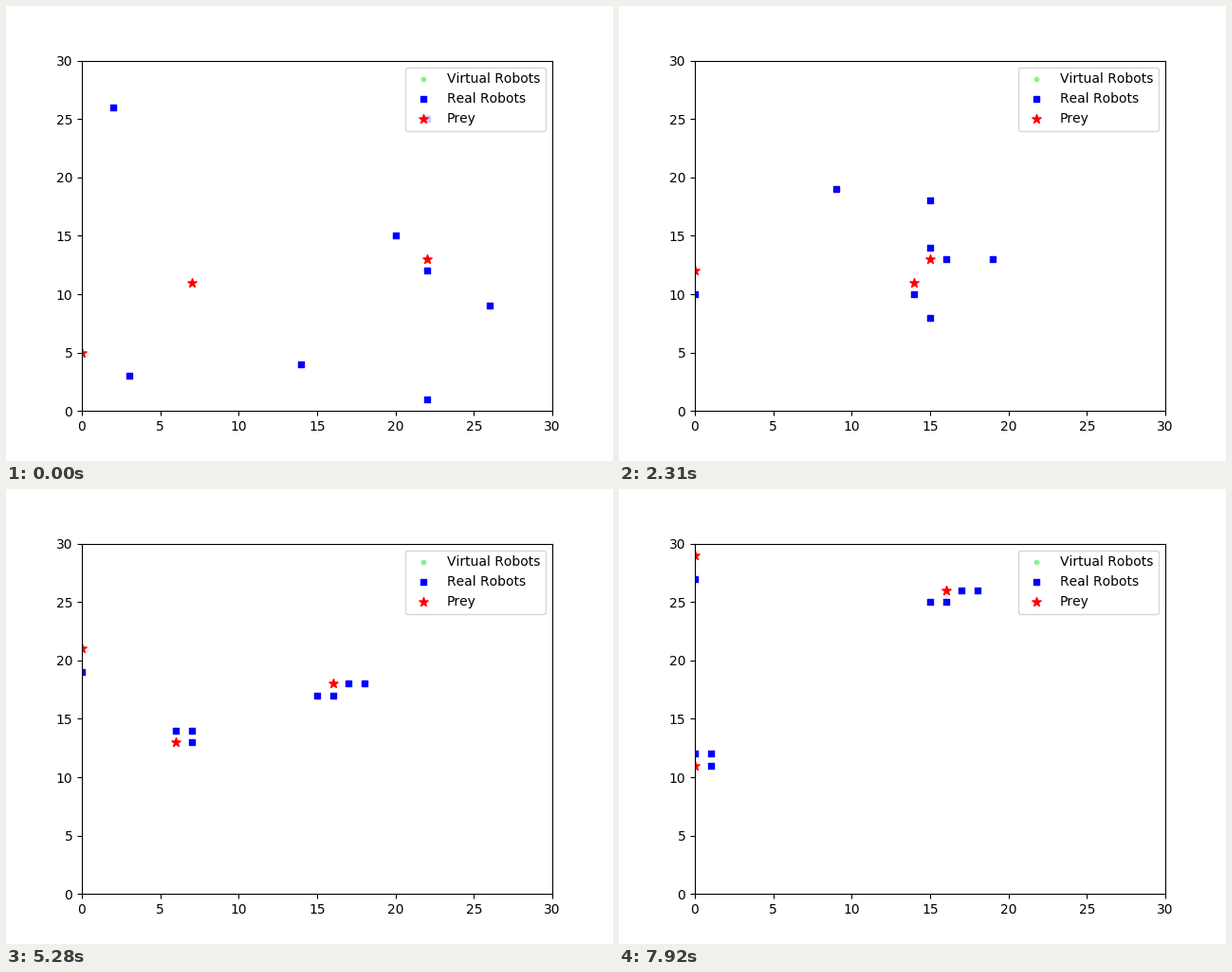
These frames come from a looping animation (640x480 px, 8 s). A matplotlib script:

```python
import numpy as np
import matplotlib.pyplot as plt
from matplotlib.animation import FuncAnimation

STEP_MS = 330
TICK_MS = 20
LOOP_MS = 8000
STEPS = 25
NEAR = 2

RIGHT, LEFT, UP, DOWN = (1, 0), (-1, 0), (0, 1), (0, -1)

# start, first heading, step of the turn, second heading
PREY = [((0, 5), UP, STEPS, UP),
        ((22, 13), LEFT, 22, DOWN),
        ((7, 11), RIGHT, 9, UP)]

# start, place kept beside the prey once it is near
ROBOTS = [((3, 3), (0, -2)), ((20, 15), (0, 1)),
          ((22, 12), (1, 0)), ((2, 26), (1, 1)),
          ((22, 25), (2, 0)), ((14, 4), (0, -1)),
          ((22, 1), (-1, -1)), ((26, 9), (1, 0))]


def prey_at(k):
    return np.array([np.add(start, np.multiply(first, min(k, turn))
                            + np.multiply(second, max(k - turn, 0)))
                     for start, first, turn, second in PREY])


def hunt(pos, slot, prey):
    """One king's move towards the nearest prey, or to its slot when near."""
    goal = min(prey, key=lambda p: np.hypot(*(p - pos)))
    if np.abs(goal - pos).max() <= NEAR:
        goal = goal + slot
    return pos + np.sign(goal - pos)


prey = [prey_at(k) for k in range(STEPS)]
slots = [np.array(slot) for _, slot in ROBOTS]
robots = [np.array([start for start, _ in ROBOTS])]
for k in range(1, STEPS):
    robots.append(np.array([hunt(pos, slot, prey[k])
                            for pos, slot in zip(robots[-1], slots)]))

plt.rcParams["text.kerning_factor"] = 6
fig, ax = plt.subplots(figsize=(6.4, 4.8), dpi=100)
ax.set_xlim(0, 30)
ax.set_ylim(0, 30)
ax.scatter([], [], c="lightgreen", marker=".", s=40, label="Virtual Robots")
robot_dots = ax.scatter([], [], c="blue", marker="s", s=20, label="Real Robots")
prey_dots = ax.scatter([], [], c="red", marker="*", s=50, label="Prey")
ax.legend(loc="upper right")


def update(i):
    # the step in force by the end of this tick
    k = min((i * TICK_MS + TICK_MS - 1) // STEP_MS, STEPS - 1)
    robot_dots.set_offsets(robots[k])
    prey_dots.set_offsets(prey[k])
    return robot_dots, prey_dots


anim = FuncAnimation(fig, update, frames=LOOP_MS // TICK_MS,
                     interval=TICK_MS, repeat=True, repeat_delay=0)
plt.show()
```
